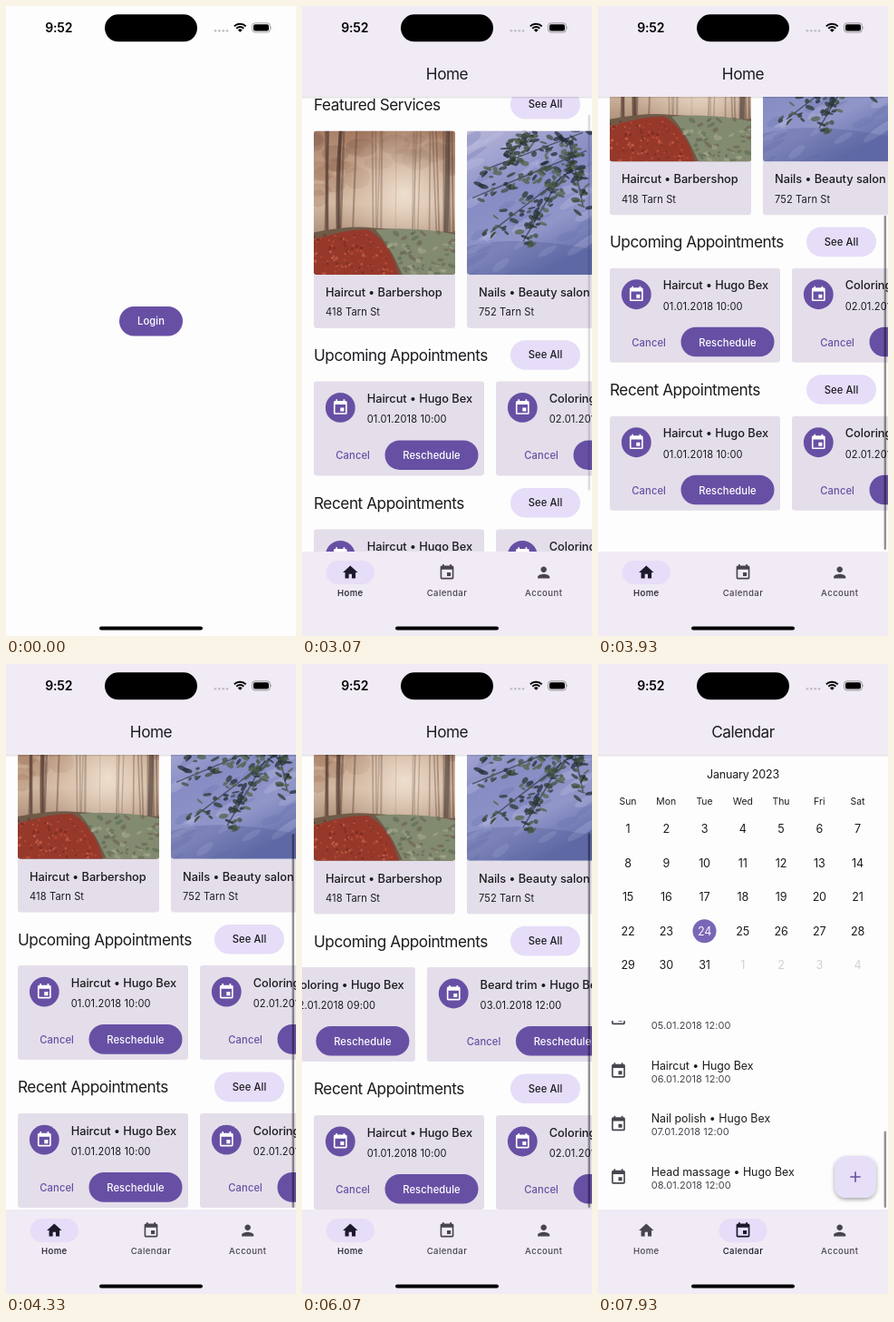
Animation of 320 by 694 pixels, one loop 8000 ms. Source, as an HTML page:

```html
<!DOCTYPE html>
<html lang="en">
<head>
<meta charset="utf-8">
<title>Appointments</title>
<style>
html, body { margin: 0; width: 100%; height: 100%; overflow: hidden; background: #fdfdfd; }
svg { display: block; width: 320px; height: 694px; }
text { font-family: Inter, "Open Sans", sans-serif; white-space: pre; }
</style>
</head>
<body>
<svg id="stage" viewBox="0 0 320 694" xmlns="http://www.w3.org/2000/svg"></svg>
<script>
const INK = '#1c1b1f', SOFT = '#49454f', PRIMARY = '#6750a4', TONAL = '#e6ddf8';
const CARD = '#e4deea', BAR = '#f0ebf4', PAGE = '#fdfdfd';
const PERSON = 'Hugo Bex';

const ICONS = {
  home: 'M10 20v-6h4v6h5v-8h3L12 3 2 12h3v8z',
  event: 'M17 12h-5v5h5v-5zM16 1v2H8V1H6v2H5c-1.11 0-2 .9-2 2v14c0 1.1.89 2 2 2h14c1.1 0 2-.9 2-2V5c0-1.1-.9-2-2-2h-1V1h-2zm3 18H5V8h14v11z',
  person: 'M12 12c2.21 0 4-1.79 4-4s-1.79-4-4-4-4 1.79-4 4 1.79 4 4 4zm0 2c-2.67 0-8 1.34-8 4v2h16v-2c0-2.66-5.33-4-8-4z'
};

// Small builders that return SVG markup
const group = (body, attrs = '') => `<g ${attrs}>${body}</g>`;
const rect = (x, y, w, h, r, fill, attrs = '') =>
  `<rect x="${x}" y="${y}" width="${w}" height="${h}" rx="${r}" fill="${fill}" ${attrs}/>`;
const circle = (x, y, r, fill, attrs = '') => `<circle cx="${x}" cy="${y}" r="${r}" fill="${fill}" ${attrs}/>`;
const path = (d, fill, attrs = '') => `<path d="${d}" fill="${fill}" ${attrs}/>`;
const ellipse = (x, y, rx, ry, fill, o, turn = 0) =>
  `<ellipse cx="${x}" cy="${y}" rx="${rx}" ry="${ry}" fill="${fill}" opacity="${o}" transform="rotate(${turn} ${x} ${y})"/>`;
const text = (x, y, str, size, { w = 400, fill = INK, ls = 0, mid = false } = {}) =>
  `<text x="${x}" y="${y}" font-size="${size}" font-weight="${w}" fill="${fill}" letter-spacing="${ls}"${mid ? ' text-anchor="middle"' : ''}>${str}</text>`;
const icon = (name, cx, cy, fill, attrs = '', size = 19.7) =>
  `<path d="${ICONS[name]}" fill="${fill}" transform="translate(${cx - size / 2} ${cy - size / 2}) scale(${size / 24})" ${attrs}/>`;

const heading = (x, y, str, mid) => text(x, y, str, 17.2, { ls: -0.44, mid });
const label = (x, y, str, fill, mid) => text(x, y, str, 11.2, { w: 500, ls: 0.1, fill, mid });
const title = (x, y, str) => text(x, y, str, 12.8, { w: 500, ls: -0.03 });
const detail = (x, y, str) => text(x, y, str, 11.1, { ls: 0.12 });

function random(seed) {
  return () => (seed = (seed * 16807) % 2147483647) / 2147483647;
}

function forest() {
  const rnd = random(77), span = (a, b) => +(a + rnd() * (b - a)).toFixed(1);
  let s = rect(0, 0, 156, 159, 0, 'url(#woods)');
  for (let i = 0; i < 34; i++) {
    const x = span(0, 156);
    s += ellipse(x, span(0, 30 + Math.abs(x - 95) * 0.5), span(8, 20), span(5, 12), i % 3 ? '#93654c' : '#6f4a3c', 0.22);
  }
  s += rect(0, 0, 156, 159, 0, 'url(#mist)');
  for (let i = 0; i < 22; i++) {
    const x = span(0, 156), far = Math.max(0, 1 - Math.abs(x - 95) / 70);
    s += path(`M${x} 0L${x + span(-5, 5)} 116`, 'none',
      `stroke="#5b4238" stroke-width="${(2.6 - far * 1.8).toFixed(1)}" opacity="${(0.55 - far * 0.4).toFixed(2)}"`);
  }
  s += path('M148 0L146 122', 'none', 'stroke="#514038" stroke-width="5" opacity=".7"');
  s += path('M30 0Q25 50 27 118', 'none', 'stroke="#4e372e" stroke-width="4" opacity=".7"');
  s += path('M0 112Q40 104 66 107L156 112V159H0Z', '#6f5a48');
  s += path('M68 109Q110 105 156 114V159H98Q84 126 68 109Z', '#828a70');
  s += path('M0 120Q38 108 60 109Q84 122 94 159H0Z', '#96392b');
  for (let i = 0; i < 110; i++) {
    const y = span(114, 158), x = span(0, 58 + (y - 110) * 0.75);
    s += circle(x, y, span(0.6, 1.8), ['#c14a33', '#742a22', '#d0664a'][i % 3], 'opacity=".7"');
  }
  for (let i = 0; i < 60; i++) {
    const y = span(112, 158);
    s += ellipse(span(72 + (y - 112) * 0.6, 156), y, span(1.5, 5), span(1, 2.5), ['#5d6b50', '#a5aa8c', '#6d604c'][i % 3], 0.6, span(-40, 40));
  }
  return s;
}

function pond() {
  const rnd = random(4211), span = (a, b) => +(a + rnd() * (b - a)).toFixed(1);
  let s = rect(0, 0, 156, 159, 0, 'url(#water)');
  for (let i = 0; i < 46; i++)
    s += ellipse(span(0, 156), span(0, 159), span(8, 24), span(2, 6), i % 2 ? '#c6c5e6' : '#626bab', 0.26, span(-40, -15));
  s += path('M0 128Q50 112 156 134V159H0Z', '#4d5893', 'opacity=".3"');
  const boughs = [[128, 2, 22, 42], [132, 22, 6, 74], [122, 38, 26, 112], [104, 50, 62, 122], [112, 8, 128, 82], [70, 2, 44, 30]];
  boughs.forEach(([x1, y1, x2, y2]) => {
    s += path(`M${x1} ${y1}L${x2} ${y2}`, 'none', 'stroke="#232c31" stroke-width="1.5" opacity=".6"');
    for (let i = 0; i < 42; i++) {
      const k = rnd();
      s += ellipse((x1 + (x2 - x1) * k + span(-9, 9)).toFixed(1), (y1 + (y2 - y1) * k + span(-9, 9)).toFixed(1),
        span(2, 6), span(1, 2.8), ['#2c3a32', '#3f5040', '#242e36', '#53634a'][i % 4], 0.75, span(-60, 40));
    }
  });
  return s;
}

const service = (x, photo, name, street) => group(
  rect(0, 159, 156, 217.5, 3.3, CARD) +
  group(photo, 'transform="translate(0 159)" clip-path="url(#photo)"') +
  title(13, 341.5, name) + detail(13, 363, street), `transform="translate(${x} 0)"`);

const VISITS = [
  ['Haircut', '01.01.2018 10:00', 13, 188],
  ['Coloring', '02.01.2018 09:00', 214, 195],
  ['Beard trim', '03.01.2018 12:00', 422, 207.5],
  ['Shaving', '04.01.2018 12:00'],
  ['Manicure', '05.01.2018 12:00'],
  ['Haircut', '06.01.2018 12:00'],
  ['Nail polish', '07.01.2018 12:00'],
  ['Head massage', '08.01.2018 12:00']
];

const visitCards = y => VISITS.slice(0, 3).map(([name, when, x, w]) => group(
  rect(0, 0, w, 104, 3.3, CARD) +
  circle(29.3, 29, 16.4, PRIMARY) + icon('event', 29.3, 29, '#fff') +
  title(58.7, 23.5, `${name} • ${PERSON}`) + detail(58.7, 45.8, when) +
  label(w - 163.7, 86, 'Cancel', PRIMARY) +
  rect(w - 109.5, 65, 103, 32.6, 16.3, PRIMARY) + label(w - 58, 86, 'Reschedule', '#fff', true),
  `transform="translate(${x} ${y})"`)).join('');

const section = (y, str) => heading(13, y + 6.2, str) +
  rect(230, y - 16.5, 77, 32.6, 16.3, TONAL) + label(268.5, y + 3.8, 'See All', INK, true);

function homePage() {
  return group(
    section(130, 'Featured Services') +
    service(13, forest(), 'Haircut • Barbershop', '418 Tarn St') +
    service(182, pond(), 'Nails • Beauty salon', '752 Tarn St') +
    section(406.3, 'Upcoming Appointments') + group(visitCards(435), 'id="row"') +
    section(569, 'Recent Appointments') + visitCards(598), 'id="feed"');
}

function calendarPage() {
  let s = text(160, 125.8, 'January 2023', 12.5, { ls: -0.2, mid: true });
  const colX = c => 33 + c * 42.25;
  'Sun Mon Tue Wed Thu Fri Sat'.split(' ').forEach((d, c) => s += text(colX(c), 155, d, 10.4, { mid: true }));
  for (let i = 0; i < 35; i++) {
    const x = colX(i % 7), y = 181.7 + Math.floor(i / 7) * 37.5, today = i === 23;
    if (today) s += circle(x, y, 13, '#7a66b7');
    s += text(x, y + 4.6, i < 31 ? i + 1 : i - 30, 12.6,
      { ls: -0.2, mid: true, fill: today ? '#fafafa' : i < 31 ? INK : '#d2d1d3' });
  }
  const items = VISITS.map(([name, when], i) => {
    const y = 422.25 + i * 58.5;
    return icon('event', 22.5, y - 0.3, SOFT) +
      text(58.7, y - 2, `${name} • ${PERSON}`, 12.4) +
      text(58.7, y + 12.4, when, 11, { ls: 0.05, fill: SOFT });
  }).join('');
  return s + group(group(items, 'id="list"'), 'clip-path="url(#listBox)"') +
    rect(261, 542, 46, 46, 13, '#e6dff7', 'filter="url(#lift)"') +
    path('M278.3 565h11.4M284 559.3v11.4', 'none', `stroke="${PRIMARY}" stroke-width="1.6"`);
}

function statusBar() {
  const arc = r => {
    const k = r * 0.707;
    return `M${258.3 - k} ${28.8 - k}A${r} ${r} 0 0 1 ${258.3 + k} ${28.8 - k}`;
  };
  let s = text(58.3, 28.8, '9:52', 14, { w: 600, ls: -0.1, fill: '#000', mid: true }) +
    rect(109, 9.3, 102, 30, 15, '#000');
  for (let i = 0; i < 4; i++) s += circle(231 + i * 4.35, 27.3, 1.35, '#c2c0c4');
  s += path(arc(9.1) + arc(5.7), 'none', 'stroke="#000" stroke-width="2"');
  s += path(arc(3.4) + 'L258.3 28.8Z', '#000');
  s += rect(271.6, 18.8, 19.8, 10.2, 3.2, 'none', 'stroke="#000" stroke-opacity=".4" stroke-width=".9"');
  s += rect(273, 20.2, 17, 7.4, 2, '#000');
  return s + path('M292.6 22.2q1.5 1.7 0 3.4z', '#000', 'opacity=".45"');
}

const TABS = [['home', 'Home', 53.3], ['event', 'Calendar', 160], ['person', 'Account', 266.7]];
const navBar = () => rect(0, 601, 320, 93, 0, BAR) + TABS.map(([name, str, x], i) =>
  group(rect(-26.5, 611, 53, 26, 13, TONAL, `id="pill${i}"`), `transform="translate(${x} 0)"`) +
  group(icon(name, x, 624, 'currentColor') + text(x, 650.3, str, 9.6, { w: 500, ls: 0.41, fill: 'currentColor', mid: true }),
    `id="tab${i}"`)).join('');

const stop = (o, c, a = 1) => `<stop offset="${o}" stop-color="${c}" stop-opacity="${a}"/>`;
const stage = document.getElementById('stage');
stage.innerHTML = `<defs>
  <linearGradient id="woods" x2="0" y2="1">${stop(0, '#a98068')}${stop(0.5, '#d3b9a2')}${stop(0.75, '#a88b76')}</linearGradient>
  <radialGradient id="mist" cx=".64" cy=".44" r=".5">${stop(0, '#efe1d0', 0.95)}${stop(1, '#e2cbb6', 0)}</radialGradient>
  <linearGradient id="water" x2=".5" y2="1">${stop(0, '#b9b7da')}${stop(0.45, '#878dc4')}${stop(0.75, '#9096c8')}${stop(1, '#6670ac')}</linearGradient>
  <linearGradient id="edge" x2="0" y2="1">${stop(0, '#000', 0.13)}${stop(1, '#000', 0)}</linearGradient>
  <clipPath id="photo"><path d="M0 158.5V3.3Q0 0 3.3 0H152.7Q156 0 156 3.3V155.2Q156 158.5 152.7 158.5H3.3Q0 158.5 0 155.2Z"/></clipPath>
  <clipPath id="listBox"><rect y="393" width="320" height="208"/></clipPath>
  <filter id="lift" x="-30%" y="-30%" width="160%" height="170%"><feDropShadow dx="0" dy="2" stdDeviation="2.2" flood-opacity=".35"/></filter>
</defs>` +
  rect(0, 0, 320, 694, 0, PAGE) +
  group(rect(125, 331, 70, 32.4, 16.2, PRIMARY) +
    rect(125, 331, 70, 32.4, 16.2, '#fff', 'id="press" opacity=".14"') +
    label(160, 351, 'Login', '#fff', true), 'id="login"') +
  group(
    group(homePage(), 'id="home"') + group(calendarPage(), 'id="calendar"') +
    rect(315.6, 102, 2.5, 10, 1.25, '#000', 'id="thumb"') +
    rect(0, 0, 320, 100, 0, BAR) + rect(0, 100, 320, 2.5, 0, 'url(#edge)') +
    group(heading(160, 80.8, 'Home', true), 'id="headHome"') +
    group(heading(160, 80.8, 'Calendar', true), 'id="headCal"') +
    navBar(), 'id="app"') +
  statusBar() + rect(103, 683.4, 114, 4.2, 2.1, '#000');

const $ = id => document.getElementById(id);
const show = (id, on) => $(id).setAttribute('display', on ? 'inline' : 'none');
const shift = (id, x, y) => $(id).setAttribute('transform', `translate(${x.toFixed(2)} ${y.toFixed(2)})`);
const clamp = v => Math.min(1, Math.max(0, v));

const OPEN = 1800, SWITCH = 6200, FEED_MAX = 101, LIST_MAX = 260;

// Drag past the end, hold, then spring back
function feedScroll(t) {
  if (t < 3010) return 0;
  if (t < 3400) {
    const u = (t - 3010) / 390;
    return 115.6 * (1.2 * u - 0.2 * u * u * u);
  }
  if (t < 3950) return 146.8 - 31.2 * Math.exp((3400 - t) / 130);
  const k = (t - 3950) * 0.013;
  return FEED_MAX + 45.5 * (1 + k) * Math.exp(-k);
}

const rowScroll = t => t < 4800 ? 0 : 285 * (1 - Math.exp((4800 - t) / 221));

function listScroll(t) {
  const u = clamp((t - 7150) / 780);
  return 266.2 * (1 - (1 - u) ** 2);
}

function setThumb(top, view, max, pos, alpha) {
  const track = view - 4;
  const len = track * view / (view + max) - Math.max(0, pos - max);
  $('thumb').setAttribute('y', top + 2 + (track - len) * clamp(pos / max));
  $('thumb').setAttribute('height', len);
  $('thumb').setAttribute('opacity', 0.42 * clamp(alpha));
}

function draw(t) {
  const cal = t >= SWITCH;
  show('login', t < OPEN);
  show('press', t >= 1400);
  show('app', t >= OPEN);
  show('home', !cal);
  show('headHome', !cal);
  show('calendar', cal);
  show('headCal', cal);

  shift('feed', 0, -feedScroll(t));
  shift('row', -rowScroll(t), 0);
  shift('list', 0, -listScroll(t));
  if (cal) setThumb(393, 208, LIST_MAX, listScroll(t), (t - 7150) / 200);
  else setThumb(100, 501, FEED_MAX, feedScroll(t), (t - 3010) / 200);

  const grow = 1 - (1 - clamp((t - SWITCH) / 270)) ** 3;
  $('pill0').setAttribute('opacity', 1 - clamp((t - SWITCH) / 100));
  $('pill1').setAttribute('opacity', clamp((t - SWITCH) / 100));
  $('pill1').setAttribute('transform', `scale(${0.4 + 0.6 * grow} 1)`);
  $('pill2').setAttribute('opacity', 0);
  TABS.forEach((_, i) => $('tab' + i).setAttribute('color', i === (cal ? 1 : 0) ? '#1d192b' : SOFT));
}

function tick() {
  draw(performance.now() % 8000);
  requestAnimationFrame(tick);
}
tick();
</script>
</body>
</html>
```
